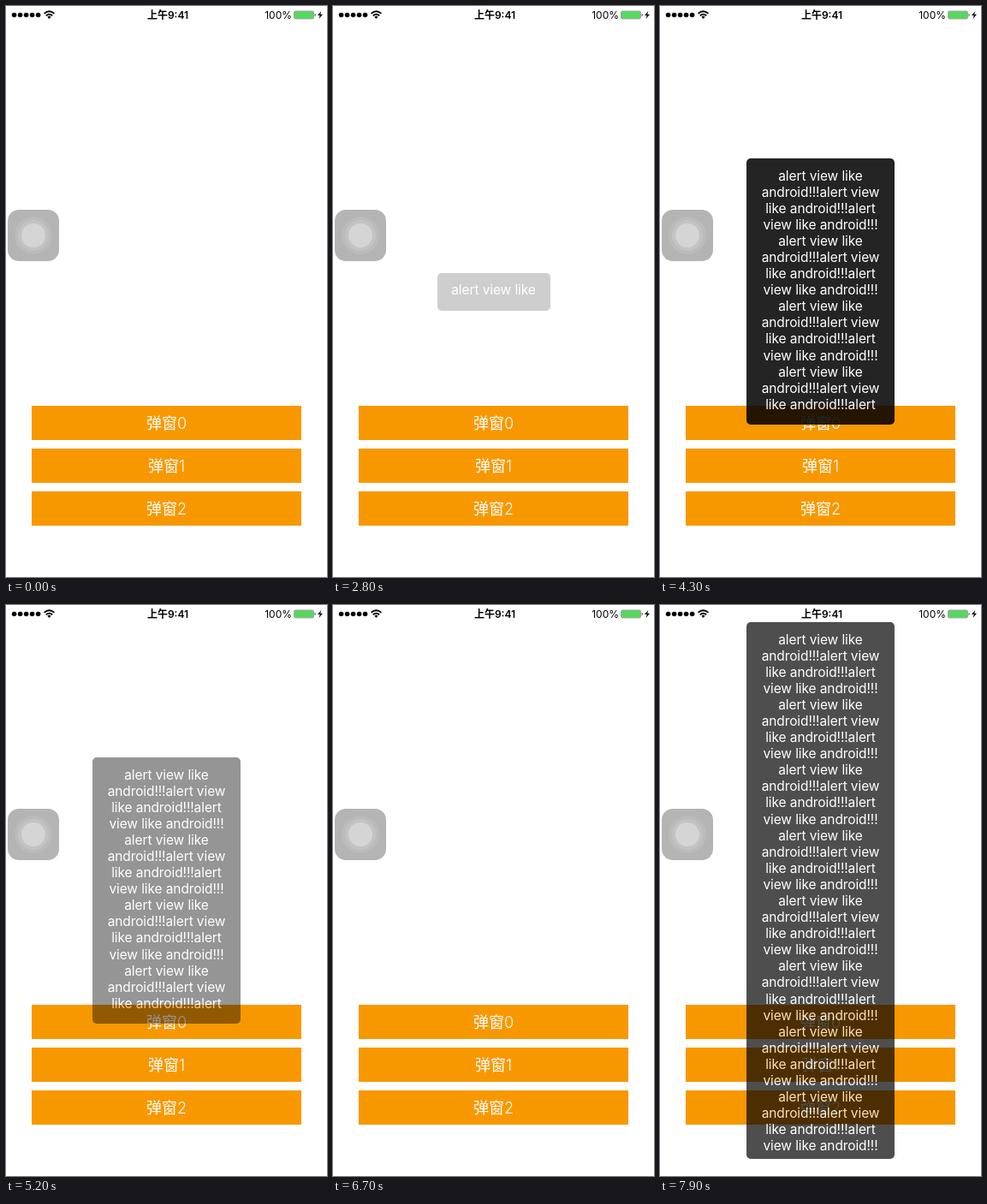
Recreate the animation shown at these times as an HTML page. Size 375 px wide and 667 px high, loop 8000 ms.

```html
<!DOCTYPE html>
<html lang="zh">
<head>
<meta charset="utf-8">
<title>Alert fade</title>
<style>
html, body { margin: 0; width: 100%; height: 100%; overflow: hidden; background: #fff; }
#stage { position: relative; width: 375px; height: 667px; overflow: hidden; font-family: Inter, "Noto Sans CJK SC", "Noto Sans CJK", sans-serif; }
#stage > * { position: absolute; }
svg { left: 0; top: 0; }
.status { top: 0; height: 21px; line-height: 21px; font-size: 12px; color: #000; white-space: nowrap; }
.time { left: 0; width: 378px; text-align: center; font-weight: 600; }
.charge { right: 41px; }
.button { left: 30px; width: 315px; height: 40px; line-height: 41px; background: #f89800; color: #fff; text-align: center; font-size: 18px; font-weight: 300; }
.alert { box-sizing: border-box; padding-top: 10.5px; border-radius: 5px; background: #000; color: #fff; opacity: 0; overflow: hidden; text-align: center; font-size: 15.5px; line-height: 19.09px; letter-spacing: -0.1px; }
.alert div { white-space: nowrap; }
</style>
</head>
<body>
<div id="stage">
  <svg width="375" height="310" viewBox="0 0 375 310">
    <g id="signal"></g>
    <g fill="none" stroke="#000" stroke-width="1.9">
      <path d="M44.6 8.9Q50.5 3.7 56.4 8.9"/>
      <path d="M46.8 11.3Q50.5 8 54.2 11.3"/>
    </g>
    <path d="M48.4 12.7Q50.5 11 52.6 12.7L50.5 15Z"/>
    <rect x="336.5" y="6" width="23" height="9" rx="1.5" fill="#55d85f" stroke="#a3a3a3"/>
    <path d="M360.5 8.7Q362 9 362 10.5T360.5 12.3Z" fill="#777"/>
    <path d="M368.3 6L364 11H366.7L365.6 15L370 9.8H367.2Z"/>
    <rect x="2" y="238" width="60" height="60" rx="13" fill="#b4b4b4"/>
    <g id="rings"></g>
  </svg>
  <div class="status time">上午9:41</div>
  <div class="status charge">100%</div>
</div>
<script>
const LOOP = 8000, STEP = 100;
const stage = document.getElementById('stage');
const phrases = ['alert view like', 'android!!!alert view', 'like android!!!alert', 'view like android!!!'];

// Opacity by age in ms
const fade = [[0, .96], [270, .87], [600, .69], [1170, .43], [1600, .19], [1770, .1], [2200, 0]];

const alerts = [
  { start: 1200, x: 121.5, y: 311.5, w: 132, h: 44, lines: 1 },
  { start: 4000, x: 101, y: 178, w: 173, h: 311, lines: 15 },
  { start: 7300, x: 101, y: 20, w: 173, h: 627, lines: 32 }
];

function addBox(className, style) {
  const el = document.createElement('div');
  el.className = className;
  Object.assign(el.style, style);
  return stage.appendChild(el);
}

function addCircle(id, cx, cy, r, fill) {
  const el = document.createElementNS('http://www.w3.org/2000/svg', 'circle');
  for (const [key, value] of Object.entries({ cx, cy, r, fill })) el.setAttribute(key, value);
  document.getElementById(id).append(el);
}

for (let i = 0; i < 5; i++) addCircle('signal', 9.6 + 7 * i, 10.5, 2.8, '#000');
for (const [r, fill] of [[22, '#bbb'], [18, '#c3c3c3'], [14, '#d5d5d5']]) addCircle('rings', 32, 268, r, fill);

for (let i = 0; i < 3; i++) addBox('button', { top: 467 + 50 * i + 'px' }).textContent = '弹窗' + i;

for (const a of alerts) {
  a.el = addBox('alert', { left: a.x + 'px', top: a.y + 'px', width: a.w + 'px', height: a.h + 'px' });
  for (let i = 0; i < a.lines; i++) {
    const line = document.createElement('div');
    line.textContent = phrases[i % phrases.length];
    a.el.append(line);
  }
}

function opacityAt(age) {
  if (age < 0) return 0;
  const i = fade.findIndex(([time]) => time > age);
  if (i < 0) return 0;
  const [t0, a0] = fade[i - 1], [t1, a1] = fade[i];
  return a0 + (a1 - a0) * (age - t0) / (t1 - t0);
}

function draw(now) {
  const time = Math.floor((now % LOOP) / STEP) * STEP;
  for (const a of alerts) a.el.style.opacity = opacityAt(time - a.start);
  requestAnimationFrame(draw);
}
requestAnimationFrame(draw);
</script>
</body>
</html>
```
